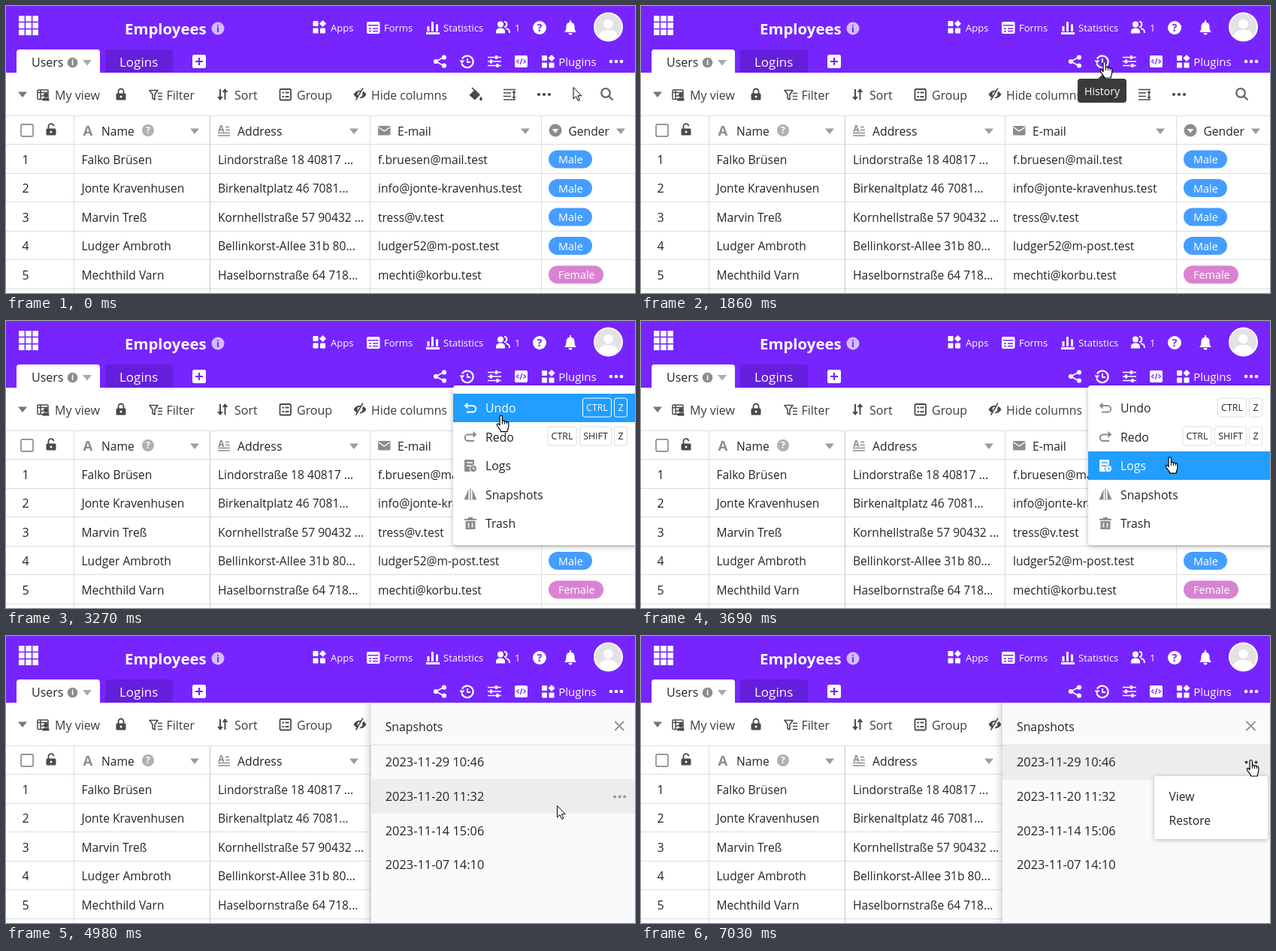
Animation, 837 px wide and 383 px high, one loop 8 s. Source, as an HTML page with a canvas:

```html
<!DOCTYPE html>
<html lang="en">
<head>
<meta charset="utf-8">
<title>Table snapshots</title>
<style>
html, body { margin: 0; width: 100%; height: 100%; overflow: hidden; background: #fff; }
canvas { display: block; width: 837px; height: 383px; }
</style>
</head>
<body>
<canvas id="stage"></canvas>
<script>
const W = 837, H = 383, LOOP = 8000;
const PURPLE = '#7625ff', INK = '#212529', SOFT = '#3c3c3c', DARK = '#4a4a4a', GRAY = '#8c8c8c', LINE = '#dcdcdc', BLUE = '#219eff';
const canvas = document.getElementById('stage');
const ctx = canvas.getContext('2d');
const dpr = window.devicePixelRatio || 1;
canvas.width = W * dpr;
canvas.height = H * dpr;

const rows = [
  ['Falko Brüsen', 'Lindorstraße 18 40817 ...', 'f.bruesen@mail.test', 'Male'],
  ['Jonte Kravenhusen', 'Birkenaltplatz 46 7081...', 'info@jonte-kravenhus.test', 'Male'],
  ['Marvin Treß', 'Kornhellstraße 57 90432 ...', 'tress@v.test', 'Male'],
  ['Ludger Ambroth', 'Bellinkorst-Allee 31b 80...', 'ludger52@m-post.test', 'Male'],
  ['Mechthild Varn', 'Haselbornstraße 64 718...', 'mechti@korbu.test', 'Female']
];
const menuItems = ['Undo', 'Redo', 'Logs', 'Snapshots', 'Trash'];
const shots = ['2023-11-29 10:46', '2023-11-20 11:32', '2023-11-14 15:06', '2023-11-07 14:10'];

// Cursor legs: start, end, target x, target y, ease-out power
const legs = [
  [840, 1680, 617, 74, 1],
  [2880, 3690, 704, 181, 1],
  [3690, 4110, 733, 226, 1],
  [5510, 6380, 812, 165, 1.4]
];

const clamp = v => Math.max(0, Math.min(1, v));

function cursorAt(t) {
  let x = 754.5, y = 108;
  for (const [a, b, tx, ty, pow] of legs) {
    const e = 1 - Math.pow(1 - clamp((t - a) / (b - a)), pow);
    x += (tx - x) * e;
    y += (ty - y) * e;
  }
  return { x, y };
}

function drawerEase(p) {
  const bez = (s, a, b) => 3 * (1 - s) * (1 - s) * s * a + 3 * (1 - s) * s * s * b + s * s * s;
  let lo = 0, hi = 1;
  for (let i = 0; i < 20; i++) {
    const mid = (lo + hi) / 2;
    if (bez(mid, 0.7, 0.1) < p) lo = mid; else hi = mid;
  }
  return bez(hi, 0.3, 1);
}

function rect(x, y, w, h, color, r = 0) {
  ctx.fillStyle = color;
  ctx.beginPath();
  ctx.roundRect(x, y, w, h, r);
  ctx.fill();
}

function frame(x, y, w, h, color, r = 0, lw = 1) {
  ctx.strokeStyle = color;
  ctx.lineWidth = lw;
  ctx.beginPath();
  ctx.roundRect(x, y, w, h, r);
  ctx.stroke();
}

function disc(x, y, r, color) {
  ctx.fillStyle = color;
  ctx.beginPath();
  ctx.arc(x, y, r, 0, 7);
  ctx.fill();
}

// Text vertically centred on its capitals
function text(s, x, y, color = INK, size = 15.6, weight = 400, align = 'left') {
  ctx.font = `${weight} ${size}px "Open Sans", "Noto Sans", sans-serif`;
  ctx.textAlign = align;
  ctx.fillStyle = color;
  ctx.fillText(s, x, y + size * 0.357);
}

// Path around (x, y); filled unless a line width is given
function icon(d, x, y, color, lw) {
  ctx.save();
  ctx.translate(x, y);
  const p = new Path2D(d);
  if (lw) {
    ctx.strokeStyle = color;
    ctx.lineWidth = lw;
    ctx.stroke(p);
  } else {
    ctx.fillStyle = color;
    ctx.fill(p);
  }
  ctx.restore();
}

const caret = (x, y, color) => icon('M-6 -3.5H6L0 4z', x, y, color);

function dots(x, y, color, r = 2.1, gap = 7) {
  for (let i = -1; i < 2; i++) disc(x + i * gap, y, r, color);
}

function badge(ch, x, y, r, color, ink) {
  disc(x, y, r, color);
  text(ch, x, y, ink, r * 1.55, 700, 'center');
}

function shadow(color, blur, y = 0) {
  ctx.shadowColor = color;
  ctx.shadowBlur = blur * dpr;
  ctx.shadowOffsetY = y * dpr;
}

function lock(x, y, open) {
  rect(x - 6.5, y - 1.5, 13, 9, DARK, 1.5);
  icon(open ? 'M-3.5 -1V-4a3.5 3.5 0 0 1 7 -.6' : 'M-3.5 -1V-4a3.5 3.5 0 0 1 7 0V-1', x, y, DARK, 1.8);
  disc(x, y + 3, 1.5, '#fff');
}

function tiles(x, y, size, gap) {
  for (let i = 0; i < 4; i++) {
    if (i !== 1) rect(x + (i % 2) * gap, y + (i >> 1) * gap, size, size, '#fff', 1);
  }
  icon('M0 -4.6L4.6 0L0 4.6L-4.6 0z', x + gap + size / 2, y + size / 2, '#fff');
}

function header() {
  rect(0, 0, W, 89, PURPLE);
  for (let i = 0; i < 9; i++) rect(17 + (i % 3) * 9.2, 13 + (i / 3 | 0) * 9.2, 7.6, 7.6, '#fff');
  text('Employees', 158, 30.5, '#fff', 20.4, 700);
  badge('i', 282, 30, 8.5, '#d3bcff', PURPLE);

  tiles(408.5, 20, 7, 9.5);
  text('Apps', 432, 29, '#fff', 13);
  rect(480, 21, 17.5, 16, '#fff', 2);
  rect(482, 25, 13.5, 1.5, PURPLE);
  icon('M483 30h3m2 0h7M483 33.5h3m2 0h7', 0, 0, PURPLE, 1.5);
  text('Forms', 503, 29, '#fff', 13);
  icon('M559 36.5h18M562 34V27M567.5 34V21M573.5 34V24.5', 0, 0, '#fff', 3);
  text('Statistics', 582, 29, '#fff', 13);
  icon('M652 36.5v-2c0-4 3-5 6-5s6 1 6 5v2z', 0, 0, '#fff');
  disc(658, 24.5, 4, '#fff');
  icon('M663 21c4.5 -.5 4.5 7 0 7M665 30c4 .5 5 2 5 6', 0, 0, '#fff', 2);
  text('1', 677, 29, '#fff', 13);
  badge('?', 710, 29, 9, '#fff', PURPLE);
  icon('M-8 6c2-2 2.5-4 2.5-8a5.5 5.5 0 0 1 11 0c0 4 .5 6 2.5 8zM-2.5 7h5a2.5 2.5 0 0 1-5 0zM-1 -10h2v4h-2z', 751, 29, '#fff');

  disc(801.5, 28, 19.5, '#fff');
  ctx.save();
  ctx.beginPath();
  ctx.arc(801.5, 28, 17.5, 0, 7);
  ctx.clip();
  rect(780, 8, 44, 44, '#e4e2e5');
  disc(801.5, 24, 6.2, '#fff');
  icon('M789 46v-5c0-7 6-9 12.5-9s12.5 2 12.5 9v5z', 0, 0, '#fff');
  ctx.restore();

  rect(14, 58, 111, 31, '#fff', [4, 4, 0, 0]);
  text('Users', 34, 75, INK, 16);
  badge('i', 88.5, 75.5, 6.8, GRAY, '#fff');
  caret(108, 75.5, '#aaa');
  rect(132, 58, 90, 31, '#651fdc', [4, 4, 0, 0]);
  text('Logins', 151, 75, '#fff', 17);
  rect(248, 65, 18, 18, '#fff', 2.5);
  icon('M252 74h10M257 69v10', 0, 0, PURPLE, 2.2);

  icon('M583 68L572 74L583 80', 0, 0, '#fff', 1.8);
  for (const [x, y] of [[583, 68.5], [572, 74], [583, 79.5]]) disc(x, y, 3.1, '#fff');
  icon('M-7 -3.5A7.8 7.8 0 1 1 -7.5 3', 614, 74, '#fff', 2.2);
  icon('M-10.5 -1.5h7l-4 4.5z', 614, 74, '#fff');
  icon('M0 -4V1H4', 614, 74, '#fff', 2);
  icon('M641 68.5h18M641 74h18M641 79.5h18', 0, 0, '#fff', 1.7);
  icon('M652.5 66v5M645.5 71.5v5M654 77v5', 0, 0, '#fff', 3.2);
  rect(677, 66, 17, 16, '#fff', 2);
  icon('M682.5 71.5l-3 2.5l3 2.5M688.5 71.5l3 2.5l-3 2.5M686.6 70l-2.2 8', 0, 0, PURPLE, 1.3);
  tiles(713, 66, 7, 9.5);
  text('Plugins', 735.3, 75, '#fff', 15);
  dots(812, 74, '#fff', 2.3);
}

function toolbar() {
  const y = 118;
  caret(22, y, '#777');
  frame(42, 112, 14, 12.5, DARK, 1, 1.5);
  icon('M42 115.5h14M46 112v12M46 120h4', 0, 0, DARK, 1.5);
  disc(53, 119, 3, DARK);
  rect(48.5, 122.5, 9, 4, DARK, [3, 3, 0, 0]);
  text('My view', 65, 119, SOFT, 16);
  lock(153, y);
  icon('M191 112.5h11l-4 5.5v7l-3-1.5v-5.5z', 0, 0, DARK, 1.6);
  icon('M202 116.5h6M202 120.5h6M202 124.5h6', 0, 0, DARK, 1.6);
  text('Filter', 213.5, 119, SOFT, 16);
  icon('M285 111v13M291.5 125v-13', 0, 0, DARK, 2);
  icon('M281 121h8l-4 5zM287.5 115h8l-4-5z', 0, 0, DARK);
  text('Sort', 304, 119, SOFT, 16);
  frame(364.5, 111, 14.5, 14.5, DARK, 1.5, 1.8);
  icon('M367.5 115.5h2.5m1.5 0h5M367.5 121h2.5m1.5 0h5', 0, 0, DARK, 1.8);
  text('Group', 387, 119, SOFT, 16);
  icon('M-8.5 0C-5 -7 5 -7 8.5 0C5 7 -5 7 -8.5 0z', 471, y, DARK);
  disc(471, y, 3.4, '#fff');
  disc(471, y, 1.5, DARK);
  icon('M-3.5 8.5L5 -8', 471, y, '#fff', 2.6);
  icon('M-5.5 7.5L4 -8.5', 471, y, DARK, 1.5);
  text('Hide columns', 486, 119, SOFT, 15.8);
  icon('M-7.5 1L0 -6.5L7 .5L0 7.5z', 624, y, DARK);
  icon('M-4 -9L2 -3', 624, y, DARK, 1.7);
  icon('M8 2.5c3 4 2 5.5 0 5.5s-3-1.5 0-5.5z', 624, y, DARK);
  icon('M662 111.5h16M662 116h10M662 120.5h10M662 125h16M676 114v9', 0, 0, DARK, 1.7);
  icon('M673.5 116l2.5-3.5l2.5 3.5zM673.5 121l2.5 3.5l2.5-3.5z', 0, 0, DARK);
  dots(716, y, DARK);
  icon('M4.3 -1a5.8 5.8 0 1 1-11.6 0a5.8 5.8 0 1 1 11.6 0M2.5 3.2L8 8.5', 799.5, 117, '#666', 2.2);
}

const checkbox = y => frame(20, y - 8, 16, 16, '#777', 1.5, 1.4);

function table(hover) {
  rect(0, 146, W, 1, LINE);
  for (let i = 0; i < 6; i++) rect(0, 184 + Math.ceil(i * 38.5), W, 1, LINE);
  for (const x of [90, 484, 712]) rect(x, 147, 1, H, LINE);
  rect(271, 147, 1, H, '#cacaca');

  checkbox(166);
  lock(60, 165, true);
  text('A', 109, 166, GRAY, 18.5, 700, 'center');
  text('Name', 127, 167);
  badge('?', 189, 166, 8, '#b0b0b0', '#fff');
  text('A', 286.5, 163.5, GRAY, 12, 700, 'center');
  icon('M292 161.5h5M292 165.5h6M282 169.5h16M282 173h16', 0, 0, GRAY, 1.6);
  text('Address', 308, 167, INK, 15.8);
  rect(495, 160, 16.5, 12.5, GRAY, 1.5);
  icon('M496 162l7.3 5l7.3-5', 0, 0, '#fff', 1.5);
  text('E-mail', 521, 167);
  disc(731, 166, 8.5, GRAY);
  icon('M-4.5 -2h9L0 3.5z', 731, 166, '#fff');
  text('Gender', 748.5, 167);
  for (const x of [251, 463, 691, 818]) caret(x, 167, '#9d9d9d');

  rows.forEach(([name, street, mail, sex], i) => {
    const y = 205 + i * 38.5;
    if (hover === i) {
      checkbox(y - 1);
      icon('M-2 2L-5 5M2 -2L5 -5', 71.5, y, '#2f7de0', 1.8);
      icon('M-6.5 1.5v5h5zM6.5 -1.5v-5h-5z', 71.5, y, '#2f7de0');
      ctx.setLineDash([3, 2]);
      icon('M.5 -19V19', 0, y, '#aaa', 1);
      ctx.setLineDash([]);
    } else {
      text(i + 1, 21.5, y, INK, 16);
    }
    text(name, 100.5, y);
    text(street, 282, y);
    text(mail, 495, y);
    const male = sex === 'Male';
    rect(722, y - 12.5, male ? 58 : 73, 24, male ? '#459eff' : '#d982d2', 12);
    text(sex, 735, y, '#fff', 14.4);
  });
}

function keys(list, y, on) {
  for (const [label, x, w] of list) {
    if (!on) rect(x, y - 12.5, w, 25, '#fff', 3);
    frame(x + 0.5, y - 12.5, w - 1, 25, on ? '#fff' : '#dedede', 3);
    text(label, x + w / 2, y + 0.5, on ? '#fff' : INK, 12.4, 400, 'center');
  }
}

const menuIcons = [
  (x, y, c) => {
    icon('M-6 -3H3a4 4 0 0 1 0 8.5H-5', x, y, c, 2);
    icon('M-8.5 -3l5-4.5v9z', x, y, c);
  },
  (x, y, c) => {
    icon('M6 -3H-3a4 4 0 0 0 0 8.5H5', x, y, c, 2);
    icon('M8.5 -3l-5-4.5v9z', x, y, c);
  },
  (x, y, c, bg) => {
    rect(x - 8, y - 8, 13, 16, c, 1);
    icon('M-5 -4h8M-5 0h5', x, y, bg, 1.5);
    disc(x + 4, y + 4, 5.2, bg);
    disc(x + 4, y + 4, 4.2, c);
    icon('M4 1.5V4.5H6.5', x, y, bg, 1.2);
  },
  (x, y, c) => {
    icon('M-2.5 -7V7H-8.5zM2.5 -7V7H8.5z', x, y, c);
    icon('M0 -8V8', x, y, c, 1.3);
  },
  (x, y, c, bg) => {
    icon('M-8 -6h5v-2h6v2h5v2h-16zM-6.5 -3h13v11h-13z', x, y, c);
    icon('M-2.5 -.5v6M2.5 -.5v6', x, y, bg, 1.5);
  }
];

function menu(cur) {
  ctx.save();
  shadow('rgba(0,0,0,.28)', 7, 2);
  rect(595, 86, 246, 213, '#fff', 4);
  ctx.restore();
  const active = cur.x > 595 && cur.y > 97 ? Math.floor((cur.y - 97) / 38.4) : -1;
  menuItems.forEach((label, i) => {
    const y = 116 + i * 38.5, on = i === active;
    if (on) rect(595, Math.floor(y - 19), 242, 38, BLUE);
    menuIcons[i](618, y, on ? '#fff' : GRAY, on ? BLUE : '#fff');
    text(label, 638, y + 0.5, on ? '#fff' : INK, 15.8);
    if (i === 0) keys([['CTRL', 767, 39], ['Z', 809, 18]], 115.5, on);
    if (i === 1) keys([['CTRL', 720.5, 39], ['SHIFT', 763, 43], ['Z', 809, 18]], 153.5, on);
  });
}

function tooltip(alpha) {
  ctx.save();
  ctx.globalAlpha = alpha;
  rect(581, 97, 65, 32, 'rgba(50,50,54,.96)', 4);
  icon('M608 97l5.5-5l5.5 5z', 0, 0, 'rgba(50,50,54,.96)');
  text('History', 613.5, 113.5, '#fff', 14.1, 400, 'center');
  ctx.restore();
}

function drawer(x, cur, overDots) {
  ctx.save();
  ctx.beginPath();
  ctx.rect(0, 89, W, H);
  ctx.clip();
  ctx.save();
  shadow('rgba(0,0,0,.28)', 12);
  rect(x, 80, 370, 320, '#fafafa');
  ctx.restore();
  ctx.translate(x - 481, 0);
  text('Snapshots', 500, 121, INK, 15.8);
  icon('M-6 -6L6 6M6 -6L-6 6', 811.5, 120, '#959595', 2);
  const active = cur.x > x ? (cur.y < 190 ? 0 : 1) : -1;
  if (active >= 0) {
    rect(481, active ? 191 : 146, 356, 46, '#ededed');
    dots(812, active ? 214.5 : 168.5, overDots ? '#444' : '#999', 2, 6.5);
  }
  rect(481, 145, 356, 1, '#e0e0e0');
  shots.forEach((s, i) => text(s, 500, 168.5 + i * 45.6, INK, 16.4));
  ctx.restore();
}

function popup() {
  ctx.save();
  shadow('rgba(0,0,0,.28)', 6, 1);
  rect(683, 187, 151, 84, '#fff', 3);
  ctx.restore();
  text('View', 702.5, 214);
  text('Restore', 702.5, 246);
}

function pointer({ x, y }, hand) {
  ctx.lineJoin = 'round';
  if (hand) {
    const d = 'M4.5 2.2a1.7 1.7 0 0 1 3.4 0V8.2a1.6 1.6 0 0 1 3 .5a1.6 1.6 0 0 1 2.8 .7a1.5 1.5 0 0 1 2.6 1V15c0 2-1.5 3.2-1.6 7H6.2C6 19 2 16.5 .8 13.2c-.5-1.6 1.2-2.4 2.4-1.2l1.3 1.5z';
    icon(d, x - 6.5, y, '#fff');
    icon(d, x - 6.5, y, '#000', 1.2);
    icon('M7.9 8v4M10.9 9v3M13.7 9.5v2.5', x - 6.5, y, '#000', 1);
  } else {
    const d = 'M.5 .5V16l3.6-3.4l2.5 5.8l2.3-1l-2.5-5.6h4.9z';
    icon(d, x, y, '#fff');
    icon(d, x, y, '#000', 1);
  }
}

function draw(t) {
  ctx.setTransform(dpr, 0, 0, dpr, 0, 0);
  rect(0, 0, W, H, '#fff');
  const cur = cursorAt(t);
  const menuOpen = t >= 2290 && t < 4580;
  const panelX = 837 - 356 * drawerEase(clamp((t - 4730) / 310));
  const overIcon = cur.y < 84 && (Math.abs(cur.x - 613) < 10 || Math.abs(cur.x - 650) < 9);
  const overMenu = menuOpen && cur.x > 595 && cur.y > 97;
  const overDots = t > 5500 && cur.x > 811;

  header();
  toolbar();
  table(t >= 4580 && panelX > cur.x ? 1 : -1);
  if (menuOpen) menu(cur);
  if (t >= 1650 && t < 2910) tooltip(clamp((t - 1650) / 210));
  if (t >= 4730) drawer(panelX, cur, overDots);
  if (t >= 7030) popup();
  pointer(cur, overIcon || overMenu || overDots);
}

const start = performance.now();
function tick() {
  draw((performance.now() - start) % LOOP);
  requestAnimationFrame(tick);
}
tick();
</script>
</body>
</html>
```
